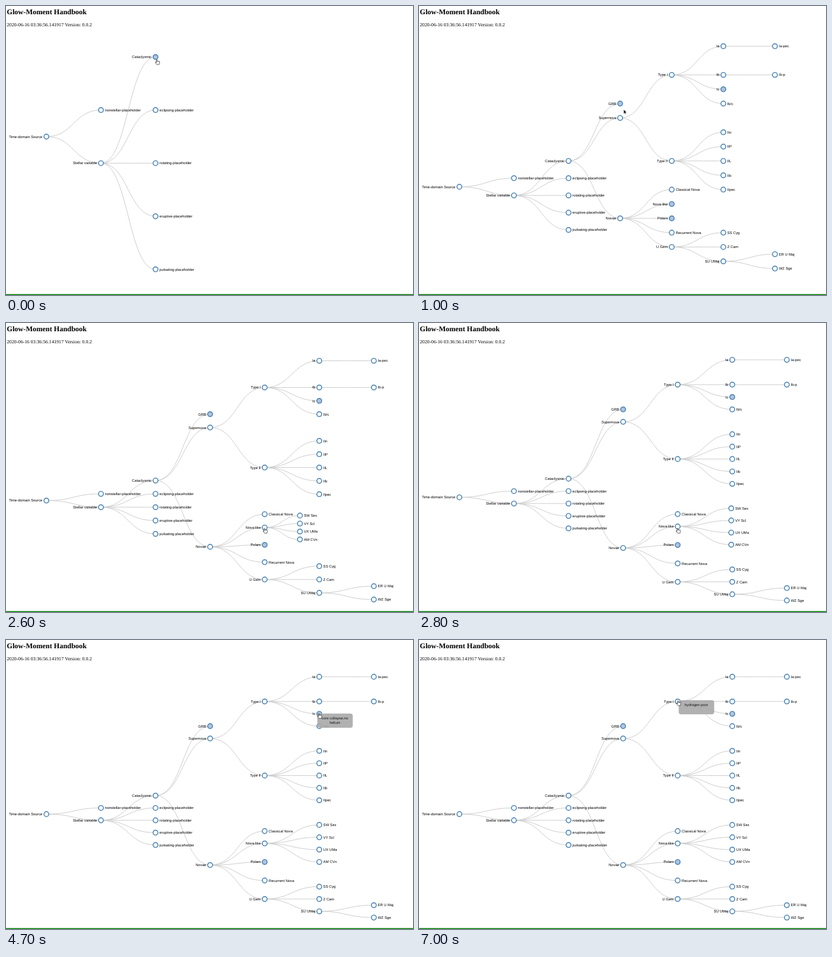
An HTML page for the animation above (7800 ms loop, 640 px wide and 455 px high).

```html
<!DOCTYPE html>
<html lang="en">
<head>
<meta charset="utf-8">
<title>Tree explorer</title>
<style>
  html, body { margin: 0; height: 100%; overflow: hidden; background: #fff; }
  svg { display: block; width: 640px; height: 455px; text-rendering: geometricPrecision; }
  .page { font-family: "Liberation Serif", "Times New Roman", serif; font-size: 16px; }
  .page .head { font-size: 24px; font-weight: bold; }
  .tree, .tip { font: 12px "Liberation Sans", Arial, sans-serif; }
  .tree path { fill: none; stroke: #ccc; stroke-width: 2; }
  .tree circle { stroke: steelblue; stroke-width: 3; }
  .tip text { text-anchor: middle; }
</style>
</head>
<body>
<svg viewBox="0 0 640 455">
  <g class="page" transform="scale(.4768)">
    <text class="head" x="2.7" y="27.4">Glow-Moment Handbook</text>
    <text x="2.7" y="66.8">2020-06-16 03:36:56.141917 Version: 0.0.2</text>
  </g>
  <rect y="453.6" width="640" height="1.4" fill="green"/>
  <g class="tree" transform="translate(63.5 38.45) scale(.4768)"><g id="links"></g><g id="nodes"></g></g>
  <g id="tips"></g>
  <g id="cursor">
    <path id="arrow" d="M0 0V14L3.3 11 5.3 15.6 7.5 14.7 5.6 10.2H10Z" stroke="#fff"/>
    <path id="hand" d="M-1.5 10V1.3a1.4 1.4 0 0 1 2.8 0V6a1.4 1.4 0 0 1 2.8 0a1.4 1.4 0 0 1 2.8 .5a1.3 1.3 0 0 1 2.6 .6V11L8 16H0L-4.5 9.5a1.3 1.3 0 0 1 2-1.6Z" fill="#fff" stroke="#000" stroke-width="1.2"/>
  </g>
</svg>
<script>
const LOOP = 7800, STEP = 100, SCALE = .4768, HEIGHT = 876.5, DURATION = 720;
const CLICKS = [0, 452, 2201];   // when each stage of the tree opens
const CLICKED = [0, 3, 14];      // node opened at each stage
const COUNTS = [8, 34, 38];      // nodes present at each stage
const LAYOUT = [[5, .5], [17.5, 1], [21.5, 1]];  // row count, top padding
const FIRST_ROWS = [1.5, 1, 2, 0, 1, 2, 3, 4];

// label, parent, row at stage 1, row at stage 2
const nodes = [
  ["Time-domain Source", -1, 9.5, 11.125],
  ["nonstellar-placeholder", 0, 9, 10.625],
  ["Stellar variable", 0, 10, 11.625],
  ["Cataclysmic", 2, 8, 9.625],
  ["eclipsing-placeholder", 2, 9, 10.625],
  ["rotating-placeholder", 2, 10, 11.625],
  ["eruptive-placeholder", 2, 11, 12.625],
  ["pulsating-placeholder", 2, 12, 13.625],
  ["GRB", 3, 4, 4],
  ["Supernova", 3, 5, 5],
  ["Novae", 3, 12, 15.25],
  ["Type I", 9, 2, 2],
  ["Type II", 9, 8, 8],
  ["Classical Nova", 10, 10, 12.5],
  ["Nova-like", 10, 11, 13.5],
  ["Polars", 10, 12, 15],
  ["Recurrent Nova", 10, 13, 16.5],
  ["U Gem", 10, 14, 18],
  ["Ia", 11, 0, 0],
  ["Ib", 11, 2, 2],
  ["Ic", 11, 3, 3],
  ["Ib/c", 11, 4, 4],
  ["IIn", 12, 6, 6],
  ["IIP", 12, 7, 7],
  ["IIL", 12, 8, 8],
  ["IIb", 12, 9, 9],
  ["IIpec", 12, 10, 10],
  ["SS Cyg", 17, 13, 17],
  ["Z Cam", 17, 14, 18],
  ["SU UMaj", 17, 15, 19],
  ["Ia-pec", 18, 0, 0],
  ["Ib-p", 19, 2, 2],
  ["ER U Maj", 29, 14.5, 18.5],
  ["WZ Sge", 29, 15.5, 19.5],
  ["SW Sex", 14, 0, 12],
  ["VY Scl", 14, 0, 13],
  ["UX UMa", 14, 0, 14],
  ["AM CVn", 14, 0, 15],
].map(([label, parent, ...rows], i) => ({
  label, parent, rows: [FIRST_ROWS[i], ...rows], born: COUNTS.findIndex(n => i < n)
}));

// left, top, lines, fade in start, fade out start
const tips = [
  [489.5, 115.8, ["core collapse,no", "helium"], 4450, 6200],
  [408.4, 94.7, ["hydrogen poor"], 6800, LOOP],
];

// time, x, y, hand
const moves = [
  [0, 237, 84.5, 1], [600, 237, 84.5, 1], [700, 235.8, 83, 0],
  [1300, 408, 243, 0], [1400, 408, 243, 0], [2100, 406.3, 322, 1], [2200, 406.3, 322.7, 1],
  [2300, 406.5, 323.3, 1], [3300, 406.5, 323.3, 1], [3500, 405.8, 322, 1], [3600, 405.8, 322, 1],
  [3700, 408, 315, 0], [4100, 483.3, 112, 0], [4200, 494, 90, 0], [4400, 492, 115.8, 1],
  [6100, 492, 115.8, 1], [6200, 466.5, 107.5, 0], [6800, 407.2, 95.7, 1], [LOOP, 407.2, 95.7, 1],
];

const $ = id => document.getElementById(id);
const mix = (a, b, k) => a + (b - a) * k;
const clamp = k => Math.max(0, Math.min(1, k));
const ease = k => (k = clamp(k)) < .5 ? 4 * k ** 3 : 1 - 4 * (1 - k) ** 3;

function add(parent, tag, attrs, text = "") {
  const el = document.createElementNS("http://www.w3.org/2000/svg", tag);
  for (const key in attrs) el.setAttribute(key, attrs[key]);
  el.textContent = text;
  return parent.appendChild(el);
}

const closed = ["GRB", "Ic", "Polars"];
nodes.forEach((n, i) => {
  const up = nodes[n.parent];
  n.depth = up ? up.depth + 1 : 0;
  const inner = closed.includes(n.label) || nodes.some(m => m.parent === i);
  if (up) n.link = add($("links"), "path", {});
  n.el = add($("nodes"), "g", {});
  n.dot = add(n.el, "circle", { r: 8 });
  add(n.el, "text", { x: inner ? -13 : 13, dy: ".35em", "text-anchor": inner ? "end" : "start" }, n.label);
});

const tipEls = tips.map(([x, y, lines]) => {
  const g = add($("tips"), "g", { class: "tip", transform: `translate(${x} ${y}) scale(${SCALE})` });
  add(g, "rect", { width: 117, height: 47, rx: 8, fill: "darkgray" });
  lines.forEach((line, i) => add(g, "text", { x: 58, y: 20 + i * 13.5 }, line));
  return g;
});

function place(i, stage) {
  const n = nodes[i];
  if (stage < n.born) return place(CLICKED[n.born], stage);
  const [rows, pad] = LAYOUT[stage];
  return [n.depth * 180, (n.rows[stage] + pad) * HEIGHT / rows];
}

function drawTree(t) {
  const stage = t < CLICKS[2] ? 1 : 2;
  const k = ease((t - CLICKS[stage]) / DURATION);
  nodes.forEach((n, i) => {
    const shown = n.born === 0 || t >= CLICKS[n.born];
    n.el.style.display = shown ? "" : "none";
    if (n.link) n.link.style.display = n.el.style.display;
    if (!shown) return;
    const from = place(i, stage - 1), to = place(i, stage);
    const x = n.x = mix(from[0], to[0], k), y = n.y = mix(from[1], to[1], k);
    n.el.setAttribute("transform", `translate(${x} ${y})`);
    const opens = CLICKED.indexOf(i);
    const full = closed.includes(n.label) || opens > 0 && t < CLICKS[opens];
    n.dot.setAttribute("fill", full ? "lightsteelblue" : "#fff");
    if (n.link) {
      const p = nodes[n.parent], mid = (x + p.x) / 2;
      n.link.setAttribute("d", `M${p.x} ${p.y}C${mid} ${p.y} ${mid} ${y} ${x} ${y}`);
    }
  });
}

function drawCursor(t) {
  const i = moves.findIndex(m => m[0] > t) - 1;
  const a = moves[i], b = moves[i + 1], k = (t - a[0]) / (b[0] - a[0]);
  $("cursor").setAttribute("transform", `translate(${mix(a[1], b[1], k)} ${mix(a[2], b[2], k)}) scale(${SCALE})`);
  $("hand").style.display = a[3] ? "" : "none";
  $("arrow").style.display = a[3] ? "none" : "";
}

function draw(now) {
  const t = Math.floor(now % LOOP / STEP) * STEP;
  drawTree(t);
  drawCursor(t);
  tips.forEach(([, , , start, end], i) => {
    tipEls[i].setAttribute("opacity", .9 * ease((t - start) / 200) * (1 - ease((t - end) / 500)));
  });
}

let begin;
function tick(now) {
  begin ??= now;
  draw(now - begin);
  requestAnimationFrame(tick);
}
draw(0);
requestAnimationFrame(tick);
</script>
</body>
</html>
```
